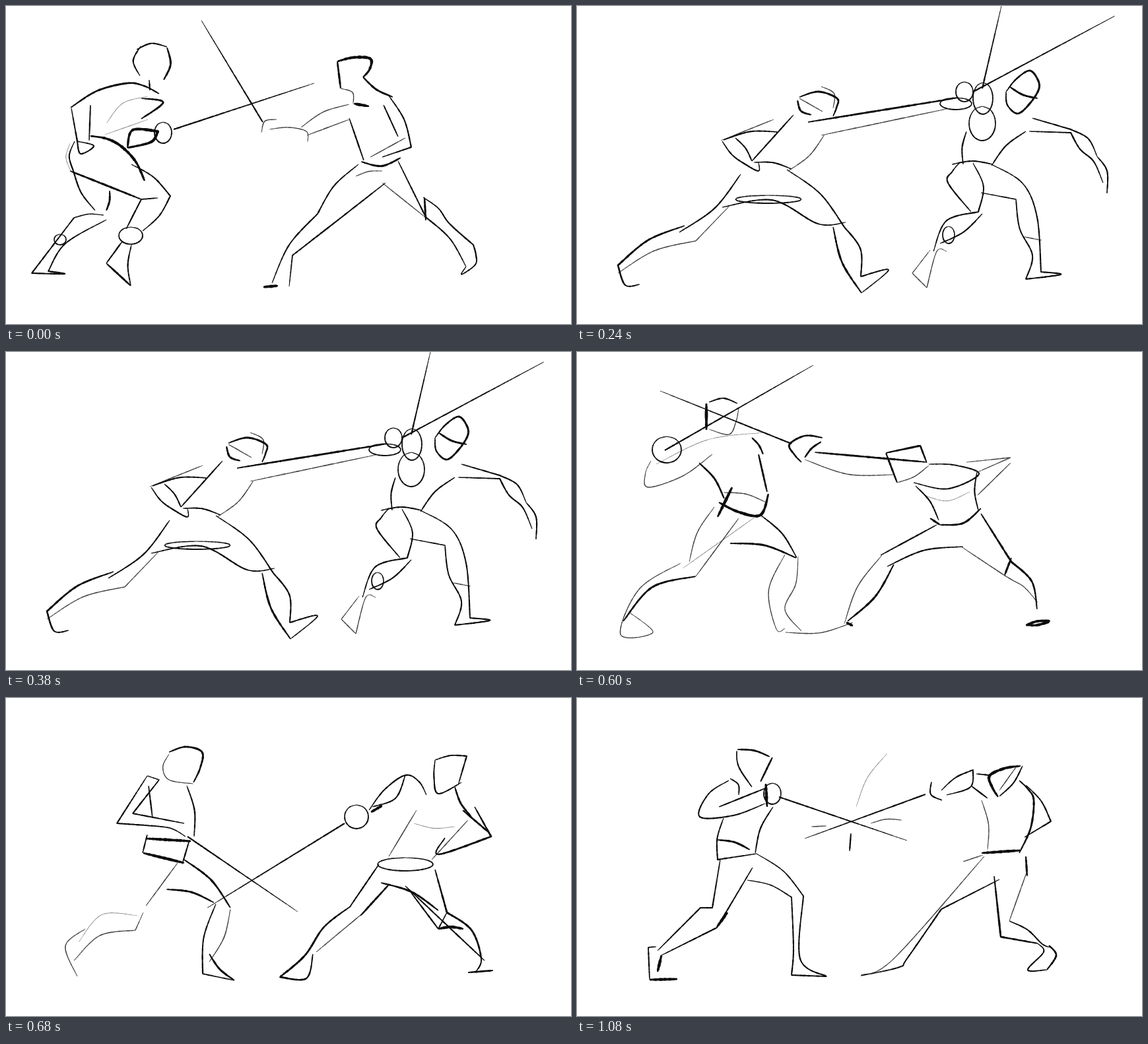
An HTML page for the animation above (1.2 s loop, 856 by 482 pixels).

```html
<!DOCTYPE html>
<html lang="en">
<head>
<meta charset="utf-8">
<title>Fencing sketch</title>
<style>
html, body { margin: 0; width: 100%; height: 100%; overflow: hidden; background: #fff; }
svg { display: block; width: 100%; height: 100%; }
</style>
</head>
<body>
<svg id="stage" viewBox="0 0 856 482"></svg>
<script>
const NS = 'http://www.w3.org/2000/svg';
const stage = document.getElementById('stage');
let layer, seed = 7;

const rand = () => (seed = seed * 16807 % 2147483647) / 2147483647;

// "(" bends clockwise, ")" counterclockwise, repeats bend more; "*" makes a corner
function parse(stroke) {
  const pts = [];
  let bend = 0;
  for (const word of stroke.trim().split(/\s+/)) {
    if (/[()]/.test(word)) {
      bend = word.length * (word[0] === ')' ? 0.08 : -0.08);
      continue;
    }
    const p = word.replace('*', '').split(',').map(Number);
    if (bend) {
      const [x, y] = pts[pts.length - 1];
      pts.push([(x + p[0]) / 2 - bend * (p[1] - y), (y + p[1]) / 2 + bend * (p[0] - x)]);
    }
    pts.push(p);
    if (word.endsWith('*')) pts.push(p);
    bend = 0;
  }
  return pts;
}

// Catmull-Rom samples about two units apart
function sample(pts) {
  const at = i => pts[Math.max(0, Math.min(pts.length - 1, i))];
  const out = [pts[0]];
  for (let i = 0; i < pts.length - 1; i++) {
    const [a, b, c, d] = [at(i - 1), at(i), at(i + 1), at(i + 2)];
    const n = Math.ceil(Math.hypot(c[0] - b[0], c[1] - b[1]) / 2);
    for (let k = 1; k <= n; k++) {
      const t = k / n;
      out.push([0, 1].map(j => b[j] + t / 2 * (c[j] - a[j]
        + t * (2 * a[j] - 5 * b[j] + 4 * c[j] - d[j]
        + t * (3 * (b[j] - c[j]) + d[j] - a[j])))));
    }
  }
  return out;
}

const pressed = t => 0.45 + 0.6 * Math.sqrt(Math.sin(Math.PI * t));
const tapered = t => 1.1 - 0.75 * t * t;

function outline(track, w, profile) {
  const left = [], right = [], last = track.length - 1;
  track.forEach(([x, y], i) => {
    const p = track[Math.max(0, i - 1)], q = track[Math.min(last, i + 1)];
    const dx = q[0] - p[0], dy = q[1] - p[1], len = Math.hypot(dx, dy) || 1;
    const r = w / 2 * profile(i / last) * (0.82 + 0.36 * rand());
    left.push((x - dy / len * r).toFixed(1) + ' ' + (y + dx / len * r).toFixed(1));
    right.unshift((x + dy / len * r).toFixed(1) + ' ' + (y - dx / len * r).toFixed(1));
  });
  return 'M' + left.concat(right).join('L') + 'Z';
}

function ink(w, lists, profile = pressed) {
  const path = document.createElementNS(NS, 'path');
  path.setAttribute('d', lists.map(pts => outline(sample(pts), w, profile)).join(''));
  path.setAttribute('fill', '#0c0c0c');
  path.setAttribute('fill-opacity', Math.min(1, 0.25 + 0.38 * w));
  layer.append(path);
}

// A slash lifts the pencil
const pencil = (w, profile) => strokes => ink(w, strokes.split('/').map(parse), profile);
const bold = pencil(4), dark = pencil(2.8), line = pencil(2.1);
const light = pencil(1.4), faint = pencil(0.8), blade = pencil(2, tapered);

function ring(cx, cy, rx, ry) {
  const turn = Math.PI / 5;
  ink(1.9, [Array.from({ length: 11 }, (_, i) =>
    [cx + rx * Math.sin(i * turn), cy - ry * Math.cos(i * turn)])]);
}

function guard() {
  dark('244,63 (( 239,112 / 98,154 ( 184,117 ( 232,133 / 205,140 238,146 205,171');
  bold('184,215 192,188 230,190* 220,206 184,215 / 128,197 ( 175,213 ( 210,265');
  dark('97,250 205,293 / 157,280 ( 152,310 / 152,390 189,424');
  line('204,61 ))) 203,106 / 198,66 (( 244,62 / 217,112 218,128');
  line('99,155 108,205* 113,224 133,212 108,205 / 128,150 126,204');
  line('104,205 )) 102,250* ) 135,310 / 148,317 ) 103,321* 39,405* 89,406 64,402* 90,360 152,324');
  line('190,240 ( 249,288* ( 207,341 / 230,291 205,293* 182,338 / 176,357 152,390 / 190,362 ) 189,424');
  faint('152,178 (( 215,137 / 150,195 215,172 / 97,208 )) 98,250');
  ring(238, 192, 13, 16);
  ring(189, 348, 18, 13);
  ring(82, 354, 9, 8);
  blade('254,187 467,117');

  blade('389,176 296,22');
  light('387,192 (((( 410,172 / 399,187 ( 455,190 457,206 / 447,184 ( 520,149 / 456,196 520,172');
  bold('502,84 ( 552,80 (( 541,108 / 527,148 550,152 / 390,426 412,424');
  dark('541,108 ) 586,138 / 502,84 507,125 / 538,236 )) 598,230 / 634,290 636,325');
  line('520,170 542,234 / 580,136 ( 614,214* 570,229 / 572,150 594,198');
  light('507,125 525,131 526,148 / 605,200 552,229 / 570,268 635,320 / 530,258 ( 570,250');
  line('534,240 ) 472,315* ) 403,420 / 575,268 515,315 434,378* 429,425');
  line('594,235 636,320* ( 697,395 / 632,290 ( 672,330 708,362* ( 711,392 690,407 697,395');
}

function lunge() {
  dark('337,138 (( 394,140 ( 388,167 / 334,143 ))) 355,165 / 350,176 578,139');
  light('337,140 372,160 / 370,122 (((( 388,155 / 370,196 560,156 / 375,195 ( 320,250 / 218,204 298,172');
  line('222,203 ( 306,191 / 328,165 265,235 / 220,205 ) 255,240 275,250 275,237 / 240,200 ( 265,235 / 268,237 ( 325,247');
  line('248,255 ( 155,343 / 220,305 (( 365,330 407,328');
  dark('163,333 ) 62,393* 73,423 95,422 / 388,335 ) 431,435');
  light('230,304 180,356* ) 62,405');
  line('318,248 ( 405,335* (( 430,410* 472,400 431,435');
  ring(574, 148, 24, 9);
  ring(587, 130, 13, 15);
  ring(290, 293, 50, 6);

  blade('614,125 643,0 / 600,130 815,15');
  ring(615, 140, 15, 24);
  ring(614, 178, 20, 26);
  ring(563, 347, 9, 13);
  dark('650,130 ( 685,98 (( 700,125 ( 668,163 652,150 650,130 / 655,122 ) 698,140');
  line('590,190 ) 585,240 / 690,170 748,187* (( 788,228 / 680,190 ) 628,242');
  line('685,190 748,192* ) 783,236 797,268 / 788,228 803,250 803,284 / 568,240 ( 630,240');
  line('580,237 ) 562,268 597,312 / 600,238 (( 608,312* ))) 540,372 / 614,315 ( 550,360');
  line('612,283 665,293* ) 690,378 680,414* 733,407 703,403* 697,320 (( 628,240'.replace('((', '))'));
  light('678,350 704,355 / 535,370 508,405* 530,427* 545,372 560,372');
}

function parry() {
  blade('325,139 126,59 / 133,149 358,20');
  bold('196,78 196,118 / 215,228 ) 278,247 290,215 / 235,205 213,250');
  line('200,76 (( 243,78 / 278,247 ( 333,312');
  ring(136, 148, 22, 20);
  light('245,85 ( 230,125 200,117 / 112,165 )) 108,205 ) 205,155');
  faint('120,170 ( 285,122 / 270,250 160,328');
  dark('265,130 ( 282,155 / 185,168 ( 223,222 / 275,155 288,212 / 180,340 )) 70,408 / 232,290 ( 332,312');
  light('222,213 ( 287,228 / 208,235 ) 170,318 / 245,252 180,340 / 157,320 )) 66,428 115,425 80,395');
  light('315,307 )) 302,420 315,419 / 335,310 ( 315,390 340,423 / 316,425 ) 418,410');

  dark('372,130 )) 322,140 ) 340,167 / 370,136 ) 345,160 / 360,152 530,167');
  dark('468,153 520,142* 530,168 / 468,153 485,198 / 550,262 )) 612,237 / 535,252 550,262');
  light('345,163 ) 480,186 / 485,198 ) 533,172 / 590,167 657,160* 607,182 / 657,168 607,217');
  line('533,170 ( 609,185 (( 510,198 / 513,203 ( 548,255 / 606,182 ) 608,240');
  faint('525,217 )) 595,212');
  line('545,262 460,308 / 470,325 ( 585,295');
  light('462,308 ) 405,412 / 582,295 650,340 ( 698,380');
  dark('480,322 ( 410,408 / 612,245 658,318* (( 697,390 / 658,312 648,338');
  bold('680,414 ( 715,408 ( 680,414 / 408,410 418,415');
}

function lower() {
  dark('247,82 (( 297,82 ( 284,128 / 270,245 ( 340,318 / 243,290 ( 315,310 / 308,388 ) 346,428');
  light('247,85 ))) 247,124 284,130 / 260,250 212,315 / 208,325 196,352* )) 103,398');
  line('274,133 ( 285,210 / 214,118 168,190* 235,195 ( 272,210 / 214,118 232,124* 192,175* 270,190 / 216,133 222,182');
  bold('212,213 280,217 / 208,235 270,250');
  line('214,207 207,235 / 278,215 267,252 / 318,312 ) 298,418* 346,428');
  light('108,422 90,376 120,350 / 340,320 ( 308,400');
  faint('200,330 ))) 110,370');
  blade('275,210 442,324');

  blade('513,190 305,318');
  ring(531, 180, 18, 18);
  ring(605, 252, 42, 10);
  bold('553,173 570,163 / 655,350 ( 693,350');
  line('550,170 ( 605,117 (( 637,147 / 555,165 590,152 605,117');
  line('650,94 ( 698,88* 685,132 / 650,94 ) 655,145 690,128');
  dark('680,135 ) 705,180 / 692,170 733,205 / 710,165 735,210* 655,237 665,212');
  light('700,185 645,245 / 622,170 580,240 / 548,320 470,385');
  faint('618,190 ) 680,195');
  dark('580,283 537,330 / 523,315 ) 453,390 415,423* 455,425 465,388 / 568,280 ( 655,322');
  dark('650,260 668,325* (( 720,395 712,415 / 700,416 738,413');
  line('565,252 520,318 / 605,285 725,398 / 610,290 655,350* 668,325');
}

function clash() {
  line('240,97 (( 286,72* 282,120');
  dark('245,118 ) 282,123 / 222,126 262,145 / 222,140 ) 218,210');
  light('290,155 574,16');
  bold('285,133 (((( 278,155 / 275,208 283,238');
  ring(260, 174, 14, 17);
  line('217,138 ) 173,207 200,215* 245,185 / 183,192 240,177 / 213,242 ( 282,238');
  light('282,155 282,215 / 215,222 ( 282,235 / 200,315 215,320 190,347 / 113,362 106,425* 130,424');
  line('217,242 203,312 / 282,238 (( 340,300* 318,380 ) 340,427* 303,413* 318,312 / 272,255 245,280 / 203,300 ) 120,378');
  dark('248,275 ( 320,312 / 250,275 ( 215,335 / 205,345 117,410* 148,427 / 118,375 118,415');

  dark('452,84 494,73');
  line('386,73 393,79');
  faint('440,40 428,62');
  light('375,0 490,195');
  ring(491, 204, 17, 20);
  ring(684, 157, 20, 16);
  bold('503,217 514,232');
  line('505,210 640,137 / 505,213 580,200 / 520,208 615,182* 528,220');
  dark('638,130 637,84* ( 692,97 ( 677,122 / 673,132 ( 717,215 / 675,180 705,212');
  line('640,132 665,127 / 717,215 690,232 / 618,242 ( 690,262 / 630,260 624,355');
  faint('640,135 ) 628,240 / 628,205 (( 685,195 684,240');
  line('625,245 ) 537,320* 485,395 470,405 427,419* ) 490,410 498,385* 550,322');
  dark('628,275 553,318 / 640,345 ( 715,375* 724,387 707,417* 683,415 702,395 700,380 / 624,358 ( 700,380');
  light('683,262 640,345 / 690,345 692,375');
}

function engage() {
  dark('243,78 ( 292,89 / 296,90 278,127 / 213,215 ( 262,230');
  line('242,80 ) 248,110 265,135 / 230,125 )) 186,180 ) 285,160 / 232,122 ((( 245,147 / 215,165 285,137');
  ring(296, 145, 13, 16);
  bold('286,130 288,165 / 110,427 152,426 / 128,390 122,415 / 228,325 212,347');
  blade('306,150 500,216');
  line('222,182 ) 213,245* 272,236 / 297,165 ) 270,235 / 120,377 108,378* 110,427');
  line('217,245 205,318* 187,318* 122,383 / 266,257 212,348* 128,390');
  line('272,236 ( 343,300* 338,395 378,422* 325,420* 328,380 325,302* ) 258,276');

  faint('470,84 ) 423,165');
  light('355,195 378,194 / 445,190 ( 492,185');
  line('415,205 413,232');
  blade('528,146 345,213');
  line('537,127 )))) 553,155 / 552,140 ( 600,109* 596,135 560,147 / 605,115 625,117 / 597,133 622,152');
  bold('638,150 ( 625,118 ( 672,103 / 613,235 672,231');
  line('675,103 ( 640,149 / 680,132 ( 718,187* 678,211');
  dark('670,125 ( 692,155 ( 670,235');
  light('640,140 665,105 / 613,155 ( 622,230 / 617,240 480,395 430,420 / 682,262 655,338 / 585,248 615,238');
  line('640,275 552,320* 500,395 488,408 430,421');
  dark('632,270 642,362* 698,372 / 680,240 682,270 / 715,375 726,390 712,412');
  line('655,338 ( 705,373 718,378 / 698,372 707,385 683,412 712,412');
}

const poses = [[guard, 240], [lunge, 240], [parry, 200], [lower, 200], [clash, 200], [engage, 120]];
const loop = poses.reduce((sum, [, hold]) => sum + hold, 0);
const layers = poses.map(([draw]) => {
  layer = stage.appendChild(document.createElementNS(NS, 'g'));
  draw();
  return layer;
});

function show(ms) {
  let t = ms % loop, n = 0;
  while (t >= poses[n][1]) t -= poses[n++][1];
  layers.forEach((g, i) => g.style.display = i === n ? '' : 'none');
}

const start = performance.now();
function tick() {
  show(performance.now() - start);
  requestAnimationFrame(tick);
}
tick();
</script>
</body>
</html>
```
